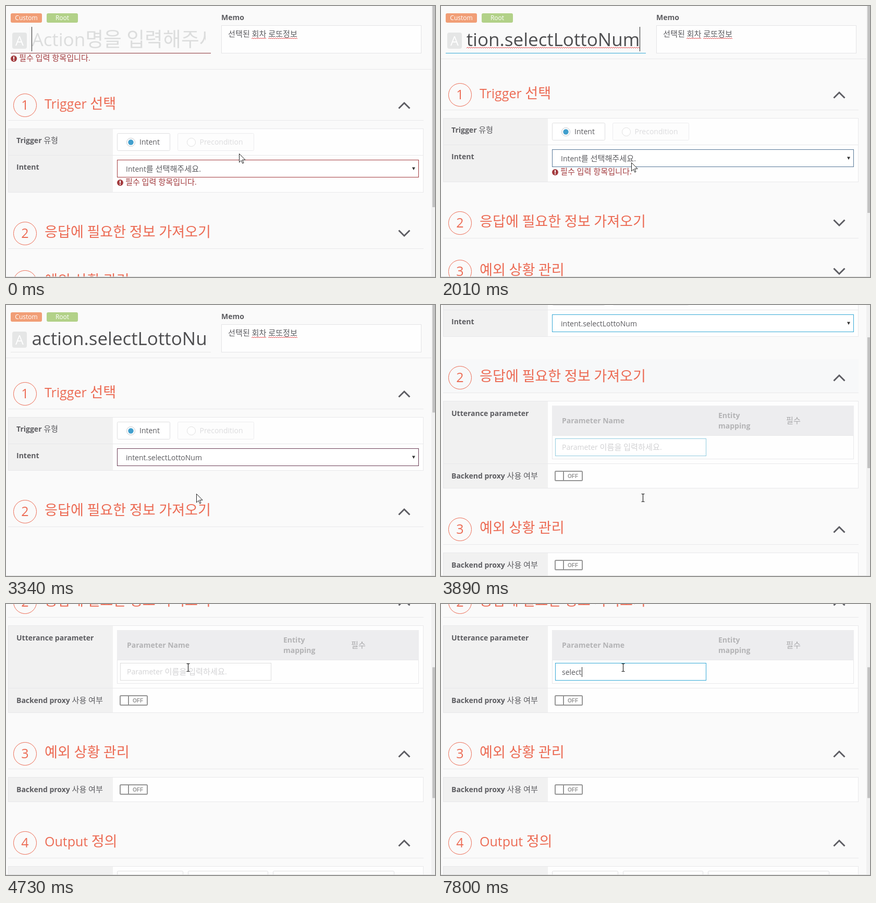
Animation, 823 px wide and 520 px high, one loop 8 s. Source, as an HTML page:

```html
<!DOCTYPE html>
<html lang="ko">
<head>
<meta charset="utf-8">
<style>
html, body { margin: 0; width: 100%; height: 100%; overflow: hidden; background: #fafafa; }
svg { display: block; width: 823px; height: 520px; font-family: "Open Sans", "Noto Sans CJK KR", "Noto Sans CJK", sans-serif; }
text { white-space: pre; }
.ko { font-family: "Noto Sans CJK KR", "Noto Sans CJK", sans-serif; }
</style>
</head>
<body>
<svg id="stage" viewBox="0 0 823 520"></svg>
<script>
const LOOP = 8000;
const CORAL = '#ec6b54', RED = '#a33c3f', BLUE = '#35a9d6', EDGE = '#e8e8ea', GRAY = '#5c5c60';
const NAME = 'action.selectLottoNum';
const HINT = 'Intent를 선택해주세요.', CHOICE = 'intent.selectLottoNum';

const stage = document.getElementById('stage');
const pen = document.createElement('canvas').getContext('2d');

// --- timing helpers ---
const ease = u => u * u * (3 - 2 * u);

function mix(a, b, u) {
  if (typeof a === 'number') return a + (b - a) * u;
  const part = (s, i) => parseInt(s.slice(i, i + 2), 16);
  return `rgb(${[1, 3, 5].map(i => Math.round(mix(part(a, i), part(b, i), u)))})`;
}

// Keys are [time, value] pairs in order.
function track(t, keys, curve = u => u) {
  const i = keys.findIndex(k => k[0] > t);
  if (i === 0) return keys[0][1];
  if (i < 0) return keys[keys.length - 1][1];
  const [t0, a] = keys[i - 1], [t1, b] = keys[i];
  return mix(a, b, curve((t - t0) / (t1 - t0)));
}

function latest(t, keys) {
  let value = keys[0][1];
  for (const [at, v] of keys) if (t >= at) value = v;
  return value;
}

// --- drawing helpers ---
const fill = (x, y, w, h, color, r = 0) =>
  `<rect x="${x}" y="${y}" width="${w}" height="${h}" rx="${r}" fill="${color}"/>`;

const box = (x0, y0, x1, y1, stroke = EDGE, bg = '#fefefe', r = 0) =>
  `<rect x="${x0 + .5}" y="${y0 + .5}" width="${x1 - x0 - 1}" height="${y1 - y0 - 1}" rx="${r}" fill="${bg}" stroke="${stroke}"/>`;

const path = (d, stroke, width = 1, bg = 'none') =>
  `<path d="${d}" fill="${bg}" stroke="${stroke}" stroke-width="${width}"/>`;

const circle = (x, y, r, bg, stroke = 'none') =>
  `<circle cx="${x}" cy="${y}" r="${r}" fill="${bg}" stroke="${stroke}"/>`;

const group = (x, y, inner) => `<g transform="translate(${x} ${y})">${inner}</g>`;

function text(x, y, s, { size = 14, color = GRAY, weight = 400, anchor = 'start', extra = '' } = {}) {
  const koWeight = weight > 400 ? 500 : 400;
  const body = s.replace(/[가-힣]+/g, m =>
    `<tspan class="ko" font-size="${(size * 1.085).toFixed(2)}" font-weight="${koWeight}">${m}</tspan>`);
  return `<text x="${x}" y="${y}" font-size="${size}" font-weight="${weight}" fill="${color}" text-anchor="${anchor}" ${extra}>${body}</text>`;
}

const label = (y, s) => text(20, y, s, { weight: 700 });

function squiggle(x0, x1, y) {
  let d = `M${x0} ${y + 1}`;
  for (let x = x0 + 2, up = true; x <= x1; x += 2, up = !up) d += `L${x} ${up ? y - 1 : y + 1}`;
  return path(d, '#e5484a');
}

function width(s, size) {
  pen.font = `${size}px "Open Sans", sans-serif`;
  return pen.measureText(s).width;
}

const error = (x, y) =>
  circle(x + 6, y - 4, 6, RED) + fill(x + 5, y - 8, 2, 5, '#fff') + fill(x + 5, y - 2, 2, 2, '#fff') +
  text(x + 16, y, '필수 입력 항목입니다.', { color: RED });

const table = (top, bottom, dividers = []) =>
  box(4, top, 801, bottom) + fill(5, top + 1, 200, bottom - top - 2, '#f1f1f1') +
  dividers.map(y => fill(4, y, 797, 1, EDGE)).join('');

const toggle = y =>
  `<rect x="219" y="${y + 1}" width="52" height="18" rx="1.5" fill="#fff" stroke="#959595" stroke-width="2"/>` +
  fill(234, y + 1, 2, 18, '#959595') +
  text(243, y + 13.5, 'OFF', { size: 10, weight: 700, color: '#959595', extra: 'font-family="Liberation Sans, sans-serif"' });

function heading(c, n, title, open, hover) {
  const [side, tip] = open ? [6.5, -4] : [-5.5, 5];
  return (hover ? fill(4, c - 35, 797, 64, '#f7f8f9') : '') +
    circle(36.5, c + .5, 22, 'none', CORAL) +
    text(36.5, c + 9, String(n), { size: 25, color: CORAL, anchor: 'middle' }) +
    text(74, c + 7, title, { size: 25, color: CORAL }) +
    path(`M753.5 ${c + side}L764 ${c + tip}L774.5 ${c + side}`, '#5c5c62', 3) +
    fill(4, c + 29, 797, 1, EDGE);
}

// --- page parts ---
function header(t) {
  const empty = t < 850, focused = t < 2080;
  const line = track(t, [[850, '#8a3438'], [1000, BLUE], [2080, BLUE], [2390, '#e6e6e6']]);
  const start = empty || !focused ? 49.5 : 381.3 - width(NAME, 35);
  const caretOn = latest(t, [[0, 1], [130, 0], [680, 1], [1380, 0], [1910, 1], [2080, 0]]);
  const name = empty
    ? text(49.5, 77, 'Action명을 입력해주세요.', { size: 35, color: '#dcdddd' })
    : text(start, 77, NAME, { size: 35, color: '#4e4e50' });
  const badge = (x, s, color) =>
    fill(x, 14, 60, 18, color, 3) + text(x + 30, 27, s, { size: 12, color: '#fff', anchor: 'middle' });
  return badge(9, 'Custom', '#f19e76') + badge(78, 'Root', '#b2d188') +
    fill(12, 51, 28, 31, '#e5e6e6', 4) +
    text(26, 76, 'A', { size: 25, color: '#fff', anchor: 'middle' }) +
    `<clipPath id="field"><rect x="49" y="38" width="${empty ? 334 : 336}" height="50"/></clipPath>` +
    `<g clip-path="url(#field)">${name}</g>` +
    (!empty && focused ? squiggle(49, 381, 80) : '') +
    (caretOn ? fill(empty ? 49 : 381, 40, 1, 47, '#222') : '') +
    fill(9, 90, 384, 1, line) +
    (empty ? error(9, 105) : '') +
    text(413, 27, 'Memo', { weight: 700 }) +
    box(413, 37, 797, 91, '#e4e4e6') +
    text(426, 59, '선택된 회차 로또정보') + squiggle(471, 499, 62) + squiggle(503, 559, 62) +
    fill(0, empty ? 121 : 101, 816, 1, EDGE);
}

function trigger(t, c) {
  const chosen = t >= 3250;
  const edge = track(t, [[1930, RED], [2010, '#567696'], [2100, BLUE], [2200, BLUE], [2390, '#8c3a48'],
    [3250, '#8c3a48'], [3340, '#6b3c55'], [3480, BLUE]]);
  return heading(c, 1, 'Trigger 선택', true) +
    table(c + 45, c + (chosen ? 148 : 168), [c + 96]) +
    label(c + 73, 'Trigger 유형') + label(c + 124, 'Intent') +
    box(213, c + 54, 315, c + 88, '#dedee0', '#fff', 2) +
    circle(239.5, c + 71.5, 8, '#fff', '#c4c8cc') + circle(239.5, c + 71.5, 5.2, '#419fcd') +
    text(256, c + 76, 'Intent') +
    box(329, c + 54, 476, c + 88, '#ececee', '#fdfdfd', 2) +
    circle(355.5, c + 71.5, 8, '#fff', '#e0e0e0') +
    text(371.5, c + 76, 'Precondition', { color: '#dcdcde' }) +
    box(213, c + 105, 792, c + 139, edge, '#fff') +
    text(230, c + 128, chosen ? CHOICE : HINT) +
    path(`M779 ${c + 119.5}h6l-3 5.5z`, 'none', 0, '#333') +
    (chosen ? '' : error(213, c + 153));
}

function typed(t) {
  const count = latest(t, [[0, 0], [5370, 1], [5530, 2], [5600, 3], [5760, 4], [5990, 5], [6230, 6],
    [6390, 7], [6550, 8], [6630, 9], [6780, 8], [6860, 7], [7010, 6]]);
  return 'selection'.slice(0, count);
}

function params(t, c) {
  const value = typed(t);
  const edge = track(t, [[3640, '#dddddd'], [3760, BLUE], [3890, '#8fcbdf'], [4010, '#dddddd'],
    [5060, '#dddddd'], [5220, BLUE]]);
  const caretOn = t >= 5060 && !(t >= 7240 && t < 7800);
  const head = { weight: 700, color: '#b3b3b5' };
  return table(c + 45, c + 213, [c + 165]) +
    label(c + 74, 'Utterance parameter') + label(c + 194, 'Backend proxy 사용 여부') +
    box(213, c + 54, 792, c + 157) + fill(213, c + 54, 579, 57, '#ededef') + fill(213, c + 111, 579, 1, EDGE) +
    text(232, c + 88, 'Parameter Name', head) +
    text(532, c + 78, 'Entity', head) + text(532, c + 97.5, 'mapping', head) +
    text(662, c + 88, '필수', { color: '#a9a9ab' }) +
    box(219, c + 117, 509, c + 151, edge, '#fff') +
    (value ? text(232, c + 140, value) : text(232, c + 139, 'Parameter 이름을 입력하세요.', { color: '#d2d2d4' })) +
    (caretOn ? fill(Math.round(232.4 + width(value, 14)), c + 125, 1, 19, '#222') : '') +
    toggle(c + 179);
}

const fallback = c => table(c + 45, c + 93) + label(c + 74, 'Backend proxy 사용 여부') + toggle(c + 59);

const output = c => table(c + 45, c + 160) +
  [[213, 340], [349, 503], [512, 745]].map(([a, b]) => box(a, c + 54, b, c + 88, '#dedee0', '#fff', 2)).join('');

function popup(t, y) {
  if (t < 2620 || t >= 3250) return '';
  const active = y > 345 ? 1 : 0;
  return fill(214, 310, 577, 70, '#fff') + fill(214, 310 + active * 35, 577, 35, '#1e90ff') +
    [HINT, CHOICE].map((s, i) => text(230, 332 + i * 35, s, { color: i === active ? '#fff' : GRAY })).join('') +
    box(213, 309, 792, 381, '#b8b8b8', 'none');
}

function cursor(t, x, y) {
  const kind = latest(t, [[0, 'arrow'], [3650, 'beam'], [4040, 'hand'], [4350, 'arrow'], [4600, 'beam']]);
  const shape = {
    arrow: path('M.5 .5V17L4.3 13.3L6.8 19L9 18L6.5 12.3H12Z', '#222', 1, '#fff'),
    beam: path('M-3 -7.5H-1L0 -6.5L1 -7.5H3M0 -6.5V6.5M-3 7.5H-1L0 6.5L1 7.5H3', '#222', 1.2),
    hand: group(3.5, -5.5, path('M-1.8 1.2Q-1.8 -.5 0 -.5T1.8 1.2V8Q5 7 5.4 9.2Q8 8.3 8.4 10.4Q10.6 10 10.6 12.5' +
      'V16Q10.6 19 8.8 22H0Q-2 18.5 -6.3 13.8Q-6.3 11 -4 12L-1.8 14ZM1.8 8V12M5.4 9V12.5M8.4 10.4V13', '#222', 1.1, '#fff'))
  };
  return group(x, y, shape[kind]);
}

function scrollbar(t, scroll) {
  const top = -44.6 + .415 * scroll;
  const end = t < 850 ? 386 : t < 3250 ? 397 : top + 251;
  return fill(816, 0, 7, 520, '#f1f1f1') + fill(818, top, 5, end - top, '#c2c2c2');
}

function draw(t) {
  const scroll = Math.round(track(t, [[3540, 0], [3890, 257], [4040, 300], [4120, 300], [4200, 315], [4450, 400]]));
  const x = track(t, [[1320, 447], [1980, 365], [3540, 365], [3800, 387.5], [4300, 387.5], [4700, 349.5]], ease);
  const y = track(t, [[1320, 283], [1980, 300], [2620, 300], [3100, 362], [3540, 362], [3800, 370],
    [4300, 370], [4700, 122]], ease);
  const c1 = t < 850 ? 190 : 170;
  const open = t >= 3250, loaded = t >= 3410;
  const c2 = c1 + (open ? 226 : 246);
  const c3 = c2 + (open ? 291 : 93);
  const c4 = c3 + 171;

  let page = header(t) + trigger(t, c1) +
    heading(c2, 2, '응답에 필요한 정보 가져오기', open, t >= 3480 && t < 4040);
  if (loaded) page += params(t, c2) + fallback(c3) + heading(c4, 4, 'Output 정의', true) + output(c4);
  if (!open || loaded) page += heading(c3, 3, '예외 상황 관리', open);

  return fill(0, 0, 823, 520, '#fafafa') + group(0, -scroll, page) + popup(t, y) +
    scrollbar(t, scroll) + fill(0, 519, 823, 1, '#d9d9d9') + cursor(t, x, y);
}

let shown = '';
function tick() {
  const next = draw(performance.now() % LOOP);
  if (next !== shown) stage.innerHTML = shown = next;
  requestAnimationFrame(tick);
}
tick();
</script>
</body>
</html>
```
